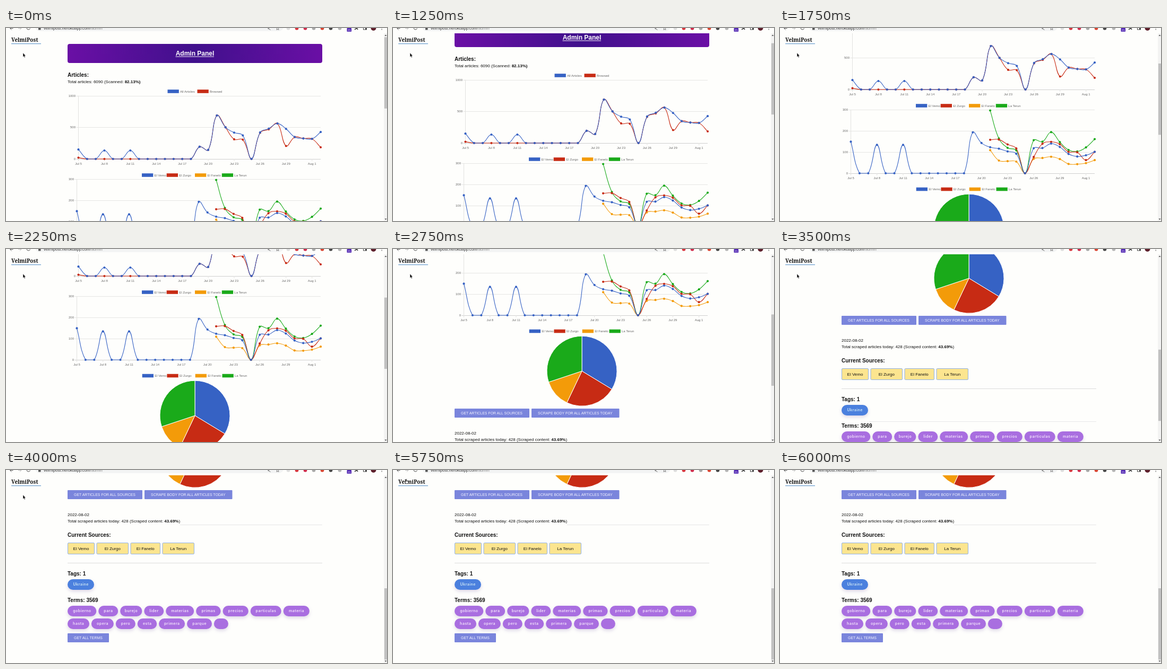
Write an HTML page that moves like this. It is 718 px wide and 364 px high and loops after 7000 ms.

```html
<!DOCTYPE html>
<html lang="en">
<head>
<meta charset="utf-8">
<title>Admin Panel</title>
<style>
  html, body { margin: 0; width: 100%; height: 100%; overflow: hidden; background: #fefefc; }
  svg { display: block; width: 718px; height: 364px; font-family: "Liberation Sans", Arial, sans-serif; }
  text { white-space: pre; }
  .pills text { font-family: Inter, sans-serif; font-weight: 600; letter-spacing: .5px; }
  .pills rect { filter: drop-shadow(0 3px 3px rgba(90, 60, 150, .2)); }
</style>
</head>
<body>
<svg id="stage" viewBox="0 0 718 364" xmlns="http://www.w3.org/2000/svg">
  <defs>
    <clipPath id="view"><rect y="10" width="712" height="354"/></clipPath>
    <linearGradient id="banner">
      <stop offset="0" stop-color="#6a0fa5"/>
      <stop offset=".5" stop-color="#40108c"/>
      <stop offset="1" stop-color="#6a0fa5"/>
    </linearGradient>
  </defs>
  <rect width="718" height="364" fill="#fefefc"/>
  <g clip-path="url(#view)"><g id="page"></g></g>
  <g id="chrome"></g>
  <rect id="thumb" x="713" width="5" height="134.5" fill="#c1c1c1"/>
  <g id="logo"></g>
  <path id="arrow" d="M32 47v7.6l1.7-1.5 1.2 2.6 1.3-.6-1.2-2.5h2.2z" fill="#111" stroke="#fff" stroke-width=".4"/>
  <path id="hand" d="M24.4 17.4q.9-.5 1.1.4v2.8l2.6.6q.7.3.6 1l-.5 3.5h-3.6l-2.3-2.8q0-.9 1-.6l.9.7z"
        fill="#fff" stroke="#111" stroke-width=".7"/>
</svg>
<script>
const BLUE = '#3662c4', RED = '#c72b14', ORANGE = '#f39b09', GREEN = '#1aaa1a';
const LOOP = 7000, STEP = 250, SCROLL_START = 1250;
const SCROLL = [30, 98, 131, 163, 196, 238, 280, 330, 384, 455, 508, 543];
const END = SCROLL[SCROLL.length - 1];
const $ = id => document.getElementById(id);

const attrs = o => Object.entries(o).map(([k, v]) => ` ${k}="${v}"`).join('');
const rect = (x, y, width, height, fill, more = {}) =>
  `<rect${attrs({ x, y, width, height, fill, ...more })}/>`;
const text = (x, y, str, size, fill = '#111', more = {}) =>
  `<text${attrs({ x, y, 'font-size': size, fill, ...more })}>${str}</text>`;
const path = (d, stroke, width = 1, more = {}) =>
  `<path${attrs({ d, stroke, 'stroke-width': width, fill: 'none', ...more })}/>`;
const bold = { 'font-weight': 700 };
const middle = { 'text-anchor': 'middle' };
const strong = str => `<tspan font-weight="700">${str}</tspan>`;
const heading = (y, str) => text(116, y, str, 10, '#111', bold);

// Daily article counts, 5 July to 2 August
const DAYS = 29, FIRST = 16;
const zeros = n => Array(n).fill(0);
const late = values => [...Array(FIRST).fill(null), ...values];
const sources = [
  { name: 'El Vemo', color: BLUE, values: [149, 0, 0, 134, 0, 0, 134, ...zeros(7), 193, 143,
    123, 116, 103, 92, 0, 118, 119, 140, 124, 91, 79, 85, 101] },
  { name: 'El Zurgo', color: RED, values: late([158, 159, 136, 117, 0, 77, 139, 148, 137, 101, 99, 62, 101]) },
  { name: 'El Fanelo', color: ORANGE, values: late([109, 60, 57, 55, 0, 68, 72, 78, 67, 44, 43, 48, 62]) },
  { name: 'La Terun', color: GREEN, values: late([296, 164, 120, 108, 0, 156, 149, 194, 147, 110, 103, 122, 161]) }
];
const all = sources[0].values.map((_, i) => sources.reduce((sum, s) => sum + s.values[i], 0));
const browsedLess = { 0: 20, 3: 0, 6: 0, 18: 310, 19: 305, 21: 414, 22: 468, 24: 205, 28: 184 };
const totals = [
  { name: 'All Articles', color: BLUE, values: all },
  { name: 'Browsed', color: RED, values: all.map((v, i) => browsedLess[i] ?? v) }
];

// Cardinal spline whose control points stay inside the plot area
function spline(points, top, bottom, tension = 0.4) {
  const cap = y => Math.min(bottom, Math.max(top, y));
  const handles = points.map((p, i) => {
    const a = points[i - 1] || p, b = points[i + 1] || p;
    const before = Math.hypot(p[0] - a[0], p[1] - a[1]);
    const after = Math.hypot(b[0] - p[0], b[1] - p[1]);
    const at = k => [p[0] + k * (b[0] - a[0]), cap(p[1] + k * (b[1] - a[1]))];
    const unit = tension / (before + after);
    return { back: at(-unit * before), fore: at(unit * after) };
  });
  return 'M' + points[0] + points.slice(1).map((p, i) =>
    `C${handles[i].fore} ${handles[i + 1].back} ${p}`).join('');
}

function lineChart({ left, top, bottom, max, step, series }) {
  const right = 593;
  const px = i => left + i * (right - left) / (DAYS - 1);
  const py = v => bottom - v * (bottom - top) / max;
  let out = '';
  for (let v = 0; v <= max; v += step) {
    const y = Math.round(py(v)) + .5;
    out += path(`M${left - 4} ${y}H${right}`, v ? '#e6e6e4' : '#cfcfcf');
    out += text(left - 5.5, y + 1.8, v, 6, '#666', { 'text-anchor': 'end' });
  }
  out += path(`M${left} ${top}V${bottom + 4}`, '#e2e2e0');
  for (let i = 0; i < DAYS; i += 3) {
    const label = i < 27 ? `Jul ${5 + i}` : 'Aug 1';
    out += path(`M${px(i)} ${bottom}v4`, '#e2e2e0');
    out += text(px(i), bottom + 10.8, label, 6, '#666', middle);
  }
  for (const { color, values } of [...series].reverse()) {
    const points = values.map((v, i) => v === null ? null : [px(i), py(v)]).filter(Boolean);
    out += path(spline(points, top, bottom), color, 1.1);
    out += points.map(([cx, cy]) => `<circle${attrs({ cx, cy, r: 2.1, fill: color })}/>`).join('');
  }
  return out;
}

const legend = (y, starts, series) => series.map((s, i) =>
  rect(starts[i], y - 3.3, 21.3, 6.6, s.color) + text(starts[i] + 23.5, y + 2, s.name, 6, '#666')).join('');

function pie(cx, cy, r, ends) {
  const at = deg => {
    const a = deg * Math.PI / 180;
    return `${cx + r * Math.sin(a)} ${cy - r * Math.cos(a)}`;
  };
  return ends.map((end, i) => path(`M${cx} ${cy}L${at(ends[i - 1] || 0)}A${r} ${r} 0 0 1 ${at(end)}Z`,
    '#fff', 1, { fill: sources[i].color })).join('');
}

const button = (x, y, width, label) =>
  rect(x, y, width, 17, '#7a85dc', { rx: 1 }) + text(x + 12, y + 10.7, label, 6.95, '#f4f4ff');

function sourceBox(x, width, label) {
  return rect(x + .5, 137.5, width - 1, 21, '#fce58f', { rx: 1.5, stroke: '#8fb0e6' }) +
    text(x + width / 2, 151, label, 8, '#111', middle);
}

const pill = (x, y, width, label, fill, ink) =>
  rect(x, y, width, 20, fill, { rx: 10 }) + text(x + width / 2 + .2, y + 12.4, label, 7, ink, middle);

function pillRow(y, words) {
  let x = 116;
  return words.map(([label, width]) => {
    const out = pill(x, y, width, label, '#a96ee0', '#f3e4fb');
    x += width + 3.9;
    return out;
  }).join('');
}

const sourceStarts = [256, 302.7, 356, 406.8];

function buildPage() {
  const upper =
    rect(116, 30, 480, 36, 'url(#banner)', { rx: 4 }) +
    text(356, 52, 'Admin Panel', 12, '#fff', { ...bold, ...middle }) +
    path('M319.5 54H392', '#fff') +
    heading(92, 'Articles:') +
    text(116, 104, `Total articles: 6090 (Scanned: ${strong('82.13%)')}`, 8) +
    legend(119.5, [304.5, 360.5], totals) +
    lineChart({ left: 136.5, top: 127.5, bottom: 247, max: 1000, step: 500, series: totals }) +
    legend(277.5, sourceStarts, sources) +
    lineChart({ left: 133.5, top: 285, bottom: 405, max: 300, step: 100, series: sources }) +
    legend(435, sourceStarts.map(x => x + .7), sources) +
    pie(356, 510.2, 66, [121.3, 205.4, 251.6, 360]);
  const lower =
    button(116, 38, 141, 'GET ARTICLES FOR ALL SOURCES') +
    button(261, 38, 165.5, 'SCRAPE BODY FOR ALL ARTICLES TODAY') +
    text(116, 87.3, '2022-08-02', 8) +
    text(116, 99.3, `Total scraped articles today: 428 (Scraped content: ${strong('43.69%')})`, 8) +
    path('M328 103.5H596', '#e6e6e6', 1, { id: 'totalsRule' }) +
    heading(126, 'Current Sources:') +
    [[116, 51], [170.5, 60.5], [234.5, 56.5], [294.5, 60.5]]
      .map(([x, w], i) => sourceBox(x, w, sources[i].name)).join('') +
    path('M116 175.5H596', '#dcdcdc') +
    heading(198.5, 'Tags: 1') +
    path('M168 237.5H596', '#e8e8e8', 1, { id: 'termsRule' }) +
    '<g class="pills">' +
    pill(116, 206, 50, 'Ukraine', '#4b80de', '#cde6f4') +
    pillRow(256, [['gobierno', 54.3], ['para', 37], ['burejo', 41.3], ['lider', 37], ['materias', 53],
      ['primas', 46.5], ['precios', 48.3], ['particulas', 58], ['materia', 49.3]]) +
    pillRow(280, [['hasta', 41], ['opera', 42], ['pero', 37], ['esta', 36.5], ['primera', 49],
      ['parque', 47], ['', 27]]) +
    '</g>' +
    heading(248.5, 'Terms: 3569') +
    button(116, 308, 78, 'GET ALL TERMS');
  return upper + `<g transform="translate(0 ${END})">${lower}</g>`;
}

function buildChrome() {
  const icons = [[532, '#dedede'], [548, '#d8343c'], [564, '#d02a4a'], [580, '#a9a9a9'],
    [596, '#d9432f'], [612, '#444'], [629, '#b5b5b5']];
  return rect(0, 0, 718, 10, '#fefefc') +
    rect(55, -12, 468, 18, '#f3f4f4', { rx: 9 }) +
    path('M13.500 .5H7.500M10.500 3.500l-3-3', '#555') +
    path('M23 .5h6M26 3.500l3-3', '#bbb') +
    path('M39 0a3.300 3.300 0 0 0 6.500 .5', '#555') +
    rect(61, 0, 4.5, 3.5, '#555') +
    text(71, 3.4, 'velmipost.herokuapp.com<tspan fill="#888">/admin</tspan>', 7.7, '#333') +
    path('M493.500 1l5-2M493.500 1l5 2.500', '#666', .9) +
    path('M510 3.500l.7-3-2-1.500M514 3.500l-.7-3 2-1.500M510 3.500l2-1.200 2 1.200', '#666', .8) +
    icons.map(([cx, fill]) => `<circle${attrs({ cx, cy: .5, r: 3.3, fill })}/>`).join('') +
    rect(642.5, 0, 8.5, 7, '#4b1fb0', { rx: 1 }) + text(646.7, 5.8, '21', 5.5, '#fff', middle) +
    path('M657 3l4-3 2 3', '#444', 1.6) +
    rect(673.5, -2, 6, 5, 'none', { stroke: '#444' }) + rect(677, -2, 2.5, 5, '#444') +
    '<circle cx="692.500" cy="0" r="5" fill="#5d1f2b"/>' +
    rect(707.5, -1, 1.4, 1.4, '#555') + rect(707.5, 2, 1.4, 1.4, '#555') +
    rect(712, 10, 6, 354, '#f3f3f2') +
    '<path d="M713.500 15l2-2.500 2 2.500zM713.500 359.500l2 2.500 2-2.500z" fill="#555"/>';
}

$('page').innerHTML = buildPage();
$('chrome').innerHTML = buildChrome();
$('logo').innerHTML =
  text(10, 26.3, 'VelmiPost', 10, '#111', { 'font-family': "'Noto Serif', serif", 'font-weight': 900 }) +
  path('M10 29.700H66', '#6d9fd0', 1.2);

const show = (id, visible) => $(id).setAttribute('visibility', visible ? 'visible' : 'hidden');

function render(t) {
  const step = Math.floor((t - SCROLL_START) / STEP);
  const scroll = step < 0 ? 0 : SCROLL[Math.min(step, SCROLL.length - 1)];
  $('page').setAttribute('transform', `translate(0 ${-scroll})`);
  $('thumb').setAttribute('y', 17.3 + scroll * .379);
  show('totalsRule', scroll === END);
  show('termsRule', scroll < END);
  show('arrow', t < 5750);
  show('hand', t >= 5750 && t < 6000);
}

const start = performance.now();
function tick() {
  render((performance.now() - start) % LOOP);
  requestAnimationFrame(tick);
}
tick();
</script>
</body>
</html>
```
